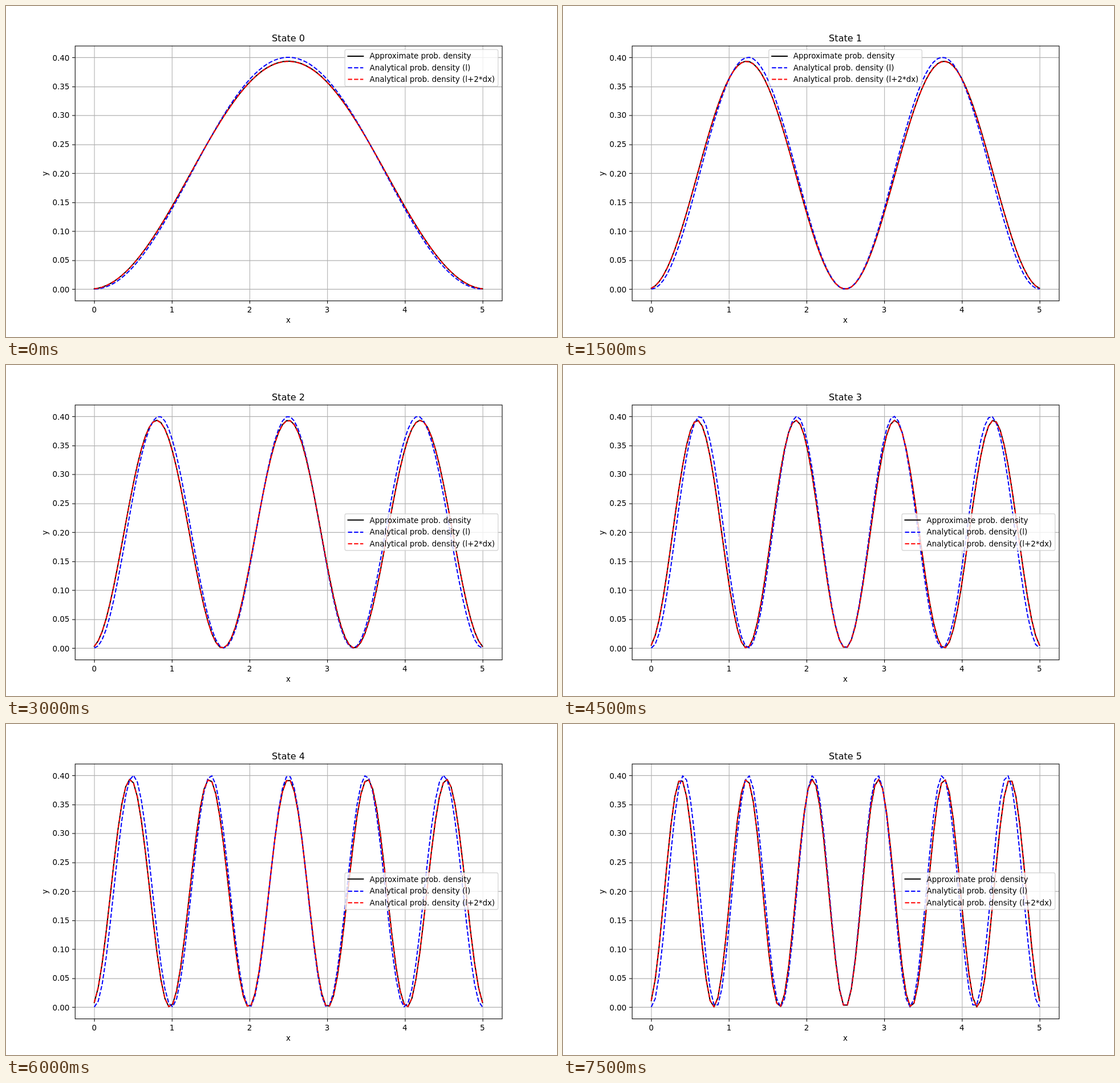
An HTML page with a canvas for the animation above (8 s loop, 966x580 px).

```html
<!DOCTYPE html>
<html lang="en">
<head>
<meta charset="utf-8">
<title>Probability densities</title>
<style>
  html, body { margin: 0; width: 100%; height: 100%; overflow: hidden; background: #fff; }
  canvas { display: block; }
</style>
</head>
<body>
<canvas id="plot" width="966" height="580"></canvas>
<script>
const canvas = document.getElementById('plot');
const ctx = canvas.getContext('2d');

const LOOP = 8000, HOLD = 1500;
const W = 1000, H = 600;                 // figure units
const BOX = { l: 125, r: 900, t: 72, b: 534 };
const EM = 1000 / 72;                    // 10pt at 100 dpi
const PT = 100 / 72;
const LEN = 5, POINTS = 100;
const DX = LEN / 110;                    // margin beyond each wall
const WIDE = LEN + 2 * DX;
const DASH = [3.7 * 1.5 * PT, 1.6 * 1.5 * PT];

const px = x => BOX.l + (BOX.r - BOX.l) * (x / LEN + 0.05) / 1.1;
const py = y => BOX.b - (BOX.b - BOX.t) * (y / 0.4 + 0.05) / 1.1;
const snap = v => Math.floor(v + 0.5) + 0.5;

const density = (x, n, len, shift) =>
  2 / len * Math.sin((n + 1) * Math.PI * (x + shift) / len) ** 2;

const SERIES = [
  { label: 'Approximate prob. density', color: '#000', dash: [],
    f: (x, n) => 1.001 * density(x, n, WIDE, DX) },
  { label: 'Analytical prob. density (l)', color: '#00f', dash: DASH,
    f: (x, n) => density(x, n, LEN, 0) },
  { label: 'Analytical prob. density (l+2*dx)', color: '#f00', dash: DASH,
    f: (x, n) => density(x, n, WIDE, DX) }
];

function segment(x1, y1, x2, y2) {
  ctx.beginPath();
  ctx.moveTo(x1, y1);
  ctx.lineTo(x2, y2);
  ctx.stroke();
}

function text(str, x, y, align, size = EM) {
  ctx.font = `${size}px "DejaVu Sans", sans-serif`;
  ctx.textAlign = align;
  ctx.fillStyle = '#000';
  ctx.fillText(str, x, y);
}

function stroke(color, width, dash = [], cap = 'butt') {
  ctx.strokeStyle = color;
  ctx.lineWidth = width * PT;
  ctx.lineCap = cap;
  ctx.setLineDash(dash);
}

function seriesStyle(s) {
  stroke(s.color, 1.5, s.dash, s.dash.length ? 'butt' : 'square');
}

function drawGrid() {
  const tick = 3.5 * PT;
  for (let i = 0; i <= 5; i++) {
    const x = snap(px(i));
    stroke('#b0b0b0', 0.8);
    segment(x, BOX.t, x, BOX.b);
    stroke('#000', 0.8);
    segment(x, BOX.b, x, BOX.b + tick + 0.5);
    text(String(i), px(i), 555, 'center');
  }
  for (let i = 0; i <= 8; i++) {
    const v = i * 0.05, y = snap(py(v));
    stroke('#b0b0b0', 0.8);
    segment(BOX.l, y, BOX.r, y);
    stroke('#000', 0.8);
    segment(BOX.l - tick, y, BOX.l, y);
    text(v.toFixed(2), BOX.l - 2 * tick, Math.round(py(v) + 5.5), 'right');
  }
}

function drawCurve(s, n) {
  seriesStyle(s);
  ctx.lineJoin = 'round';
  ctx.beginPath();
  for (let i = 0; i < POINTS; i++) {
    const x = LEN * i / (POINTS - 1);
    ctx.lineTo(px(x), py(s.f(x, n)));
  }
  ctx.stroke();
}

function drawFrame() {
  stroke('#000', 0.8, [], 'square');
  const l = snap(BOX.l), t = snap(BOX.t);
  ctx.lineJoin = 'miter';
  ctx.strokeRect(l, t, snap(BOX.r) - l, snap(BOX.b) - t);
}

function drawLegend(n) {
  const w = 278, h = 66.5, pad = EM / 2;
  const left = n === 1 ? (BOX.l + BOX.r - w) / 2 : BOX.r - pad - w;
  const top = n < 2 ? BOX.t + pad : (BOX.t + BOX.b - h) / 2;
  ctx.beginPath();
  ctx.roundRect(left, top, w, h, 0.2 * EM);
  ctx.fillStyle = 'rgba(255,255,255,0.8)';
  ctx.fill();
  stroke('rgba(204,204,204,0.8)', 1);
  ctx.stroke();
  SERIES.forEach((s, i) => {
    const y = top + 11.65 + i * 21.1, lineY = Math.round(y);
    const x = left + 0.4 * EM;
    seriesStyle(s);
    segment(x, lineY, x + 2 * EM, lineY);
    text(s.label, Math.round(x + 2.8 * EM), y + 4.86, 'left');
  });
}

function draw(n) {
  ctx.setTransform(canvas.width / W, 0, 0, canvas.height / H, 0, 0);
  ctx.fillStyle = '#fff';
  ctx.fillRect(0, 0, W, H);
  drawGrid();
  SERIES.forEach(s => drawCurve(s, n));
  drawFrame();
  text('State ' + n, (BOX.l + BOX.r) / 2, BOX.t - 7.7, 'center', 1.2 * EM);
  text('x', (BOX.l + BOX.r) / 2, 574, 'center');
  ctx.save();
  ctx.translate(75.5, (BOX.t + BOX.b) / 2 + 1);
  ctx.rotate(-Math.PI / 2);
  text('y', 0, 0, 'center');
  ctx.restore();
  drawLegend(n);
}

const start = performance.now();
function tick() {
  const t = Math.max(0, performance.now() - start) % LOOP;
  draw(Math.floor(t / HOLD));
  requestAnimationFrame(tick);
}
tick();
</script>
</body>
</html>
```
